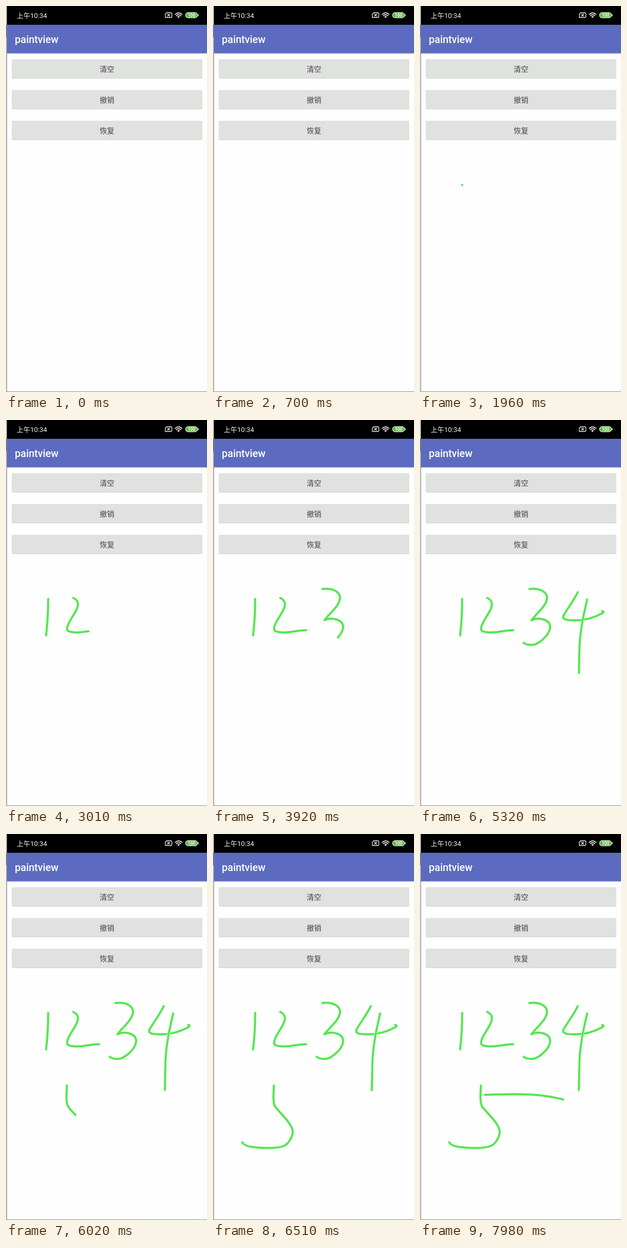
An HTML page that plays this animation: 386 by 740 pixels, repeating every 8000 ms.

```html
<!DOCTYPE html>
<html lang="zh-CN">
<head>
<meta charset="utf-8">
<title>paintview</title>
<style>
  html, body { margin: 0; width: 100%; height: 100%; overflow: hidden; background: #fefefe; }
  svg { display: block; width: 386px; height: 740px; }
  text { font-family: Roboto, "Noto Sans CJK SC", "Noto Sans CJK", sans-serif; }
  .label { font-size: 14px; fill: #414341; text-anchor: middle; }
  .ink path { fill: none; stroke-linecap: round; stroke-linejoin: round; }
</style>
</head>
<body>
<svg viewBox="0 0 386 740">
  <rect width="386" height="740" fill="#fefefe"/>
  <rect x="2" width="384" height="36" fill="#000"/>
  <rect x="2" y="36" width="384" height="55" fill="#5c6bc0"/>
  <rect x="2" y="90.5" width="384" height="1" fill="#b9bfdc"/>
  <rect x="0" width="1" height="740" fill="#d8d8d8"/>
  <rect x="1" width="1" height="740" fill="#858585"/>
  <rect x="0" y="36" width="1" height="24" fill="#667"/>
  <rect x="2" y="739" width="384" height="1" fill="#8c8c8c"/>

  <text x="20.5" y="23" font-size="13" fill="#f4f4f4">上午10:34</text>
  <g fill="none" stroke="#eee" stroke-width="1.3" stroke-linecap="round">
    <path d="M308.500 13H316.500Q318.500 13 318.500 15V20Q318.500 22 316.500 22H306V15.500Z" stroke-linejoin="round"/>
    <path d="M310.300 15.500l4 4m0-4l-4 4"/>
    <path d="M325 16.200Q331.500 10.200 338 16.200M327.200 18.600Q331.500 14.800 335.800 18.600" stroke-width="1.7"/>
    <path d="M329.300 20.500Q331.500 18.700 333.700 20.500L331.500 22.600Z" fill="#eee" stroke-width=".6"/>
  </g>
  <rect x="344.800" y="12.600" width="23" height="10" rx="5" fill="#58b83c" stroke="#eee" stroke-width="1.200"/>
  <path d="M369.300 15.800v3.600" stroke="#eee" stroke-width="1.400"/>
  <text x="356.300" y="20.700" font-size="8.500" font-weight="700" fill="#fff" text-anchor="middle">100</text>

  <text x="17" y="71" font-size="19.600" font-weight="500" fill="#fff">paintview</text>
  <g id="buttons"></g>
  <g id="ink" class="ink"></g>
</svg>
<script>
const LOOP = 8000, STEP = 70;
const NS = 'http://www.w3.org/2000/svg';

function add(parent, tag, attrs, text = '') {
  const el = document.createElementNS(NS, tag);
  for (const key in attrs) el.setAttribute(key, attrs[key]);
  el.textContent = text;
  parent.appendChild(el);
  return el;
}

const buttons = document.getElementById('buttons');
['清空', '撤销', '恢复'].forEach((name, i) => {
  const y = 102 + i * 59;
  add(buttons, 'rect', { x: 11, y: y + 0.3, width: 366, height: 36.7, rx: 2, fill: '#c9cbc9' });
  add(buttons, 'rect', { x: 11, y, width: 366, height: 36.2, rx: 2, fill: '#e0e2e0' });
  add(buttons, 'text', { x: 194, y: y + 24, class: 'label' }, name);
});

// Each stroke: path, then [time, drawn fraction] pairs.
const strokes = [
  { d: 'M81 343C81 365 80 388 77 413', keys: [[1960, 0], [2240, 1]] },
  { d: 'M129 341C137 345 141 351 136 362C131 374 122 383 118 396C115 405 121 406 130 407C147 409 160 403 179 403',
    keys: [[2520, 0], [3010, .845], [3150, 1]] },
  { d: 'M210 324C228 322 243 328 244 340C244 356 225 369 214 384C227 377 250 382 250 397C249 413 225 434 211 431Q204 431 199 427',
    keys: [[3500, 0], [3920, .78], [4130, 1]] },
  { d: 'M303 330C297 343 287 356 276 374C271 383 284 384 294 384C316 385 336 378 349 371C354 368 353 367 350 366',
    keys: [[4410, 0], [4830, 1]] },
  { d: 'M321 344C317 362 313 378 311 392C308 410 306 430 306 445L305 491',
    keys: [[5040, 0], [5110, .33], [5320, .96], [5390, 1]] },
  { d: 'M117 482C116 500 115 515 119 522C126 533 150 552 153 569C154 578 146 594 136 598C122 604 90 602 75 600Q60 598 56 591',
    keys: [[5880, 0], [5950, .17], [6440, 1]] },
  { d: 'M125 500C165 499 225 495 275 509', keys: [[6580, 0], [6790, 1]] }
];

const ink = document.getElementById('ink');
for (const s of strokes) {
  const line = (stroke, width) => add(ink, 'path', { d: s.d, pathLength: 1, stroke, 'stroke-width': width });
  s.lines = [line('#c9f7c7', 5), line('#50e64c', 3.5)];
}

function drawn(keys, t) {
  for (let i = 1; i < keys.length; i++) {
    const [t0, v0] = keys[i - 1], [t1, v1] = keys[i];
    if (t < t1) return v0 + (v1 - v0) * (t - t0) / (t1 - t0);
  }
  return 1;
}

function render(time) {
  const t = Math.floor((time % LOOP) / STEP + 1e-6) * STEP;
  for (const { keys, lines } of strokes) {
    const on = t >= keys[0][0];
    const part = on ? drawn(keys, t) : 0;
    for (const el of lines) {
      el.style.display = on ? '' : 'none';
      el.setAttribute('stroke-dasharray', part < 1 ? `${Math.max(part, .005)} 2` : 'none');
    }
  }
}

const start = performance.now();
function tick() {
  render(performance.now() - start);
  requestAnimationFrame(tick);
}
tick();
</script>
</body>
</html>
```
